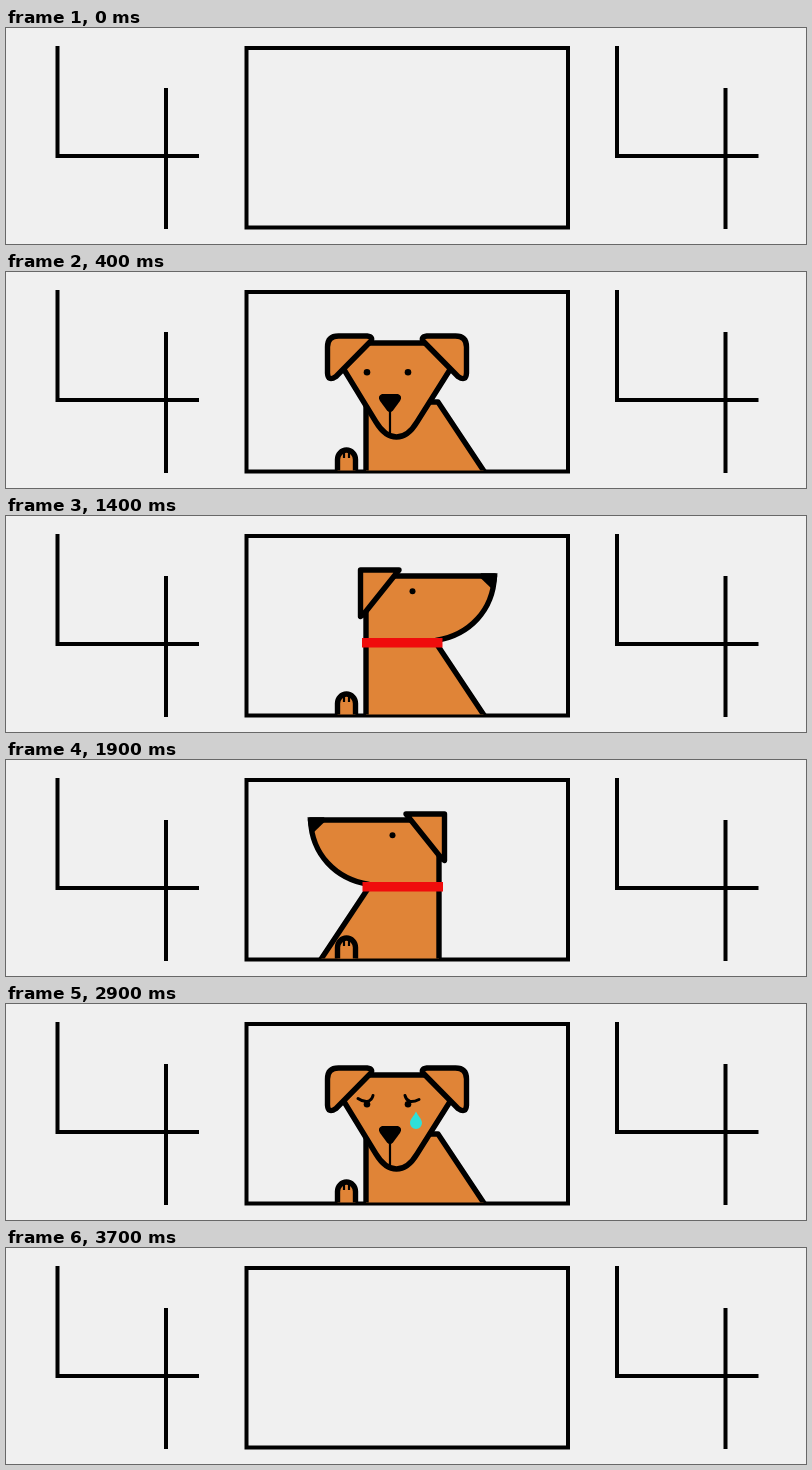
Write an HTML page that moves like this. It is 800x216 px and loops after 3.8 s.

```html
<!DOCTYPE html>
<html lang="en">
<head>
<meta charset="utf-8">
<title>404 dog</title>
<style>
html, body { margin: 0; height: 100%; overflow: hidden; background: #f0f0f0; }
svg { display: block; width: 800px; height: 216px; }
.line { fill: none; stroke: #000; stroke-width: 4; }
.fur { fill: #e08437; stroke: #000; stroke-width: 5.4; stroke-linejoin: round; }
.thin { fill: none; stroke: #000; stroke-width: 2.2; }
.lid { fill: none; stroke: #000; stroke-width: 3; stroke-linecap: round; }
</style>
</head>
<body>
<svg viewBox="0 0 800 216">
  <defs>
    <clipPath id="window"><path d="M238 18H564V198.5H238Z"/></clipPath>
    <path id="four" class="line" d="M51.5 18V128H193M160 60V201"/>
    <path id="ear" class="fur" d="M321.5 101V75Q321.5 64 332.5 64H361Q368 65 364.500 69.500L330 104.500Q322 110 321.500 101Z"/>
  </defs>
  <use href="#four"/>
  <use href="#four" x="559.500"/>
  <path class="line" d="M240.500 20H562V199.500H240.500Z"/>

  <g clip-path="url(#window)">
    <g id="front">
      <path class="fur" d="M360 215V130H432L488.500 215Z"/>
      <path class="fur" d="M362 71H420L445 96L411 150Q402 165 390.500 165Q379 165 370 150L337 96Z"/>
      <use href="#ear"/>
      <use href="#ear" transform="matrix(-1 0 0 1 782 0)"/>
      <circle cx="361" cy="100.300" r="3.300"/>
      <circle cx="402" cy="100.300" r="3.300"/>
      <path class="thin" d="M384 136V163"/>
      <path d="M376 122H392Q397 124 394 129L387 138.500Q384 142 381 138.500L374 129Q371 124 376 122Z"/>
      <g id="sad">
        <path class="lid" d="M352 94.500Q357 98 361.500 97.500Q366 96 367 91.500M399 91.500Q400 96 404 97.500Q408 98 413 95.500"/>
        <path fill="#2fe0d8" d="M410 107.500C412 112 416 115 416 119A6 6 0 0 1 404 119C404 115 408 112 410 107.500Z"/>
      </g>
    </g>
    <g id="side">
      <path class="fur" d="M360 215V60H488.500C487 94 464 119 430 124.500V127L488.500 215Z"/>
      <path class="fur" d="M354.500 54H393L357 99L354.500 100.500Z"/>
      <path d="M473 60.500L475 57.300H491.500Q491 67 487 74Z"/>
      <circle cx="406.500" cy="75.300" r="3"/>
      <path fill="#f00c0c" d="M356 122H436.500V131.500H356Z"/>
    </g>
    <g id="paw">
      <path class="fur" d="M331.500 203V187.500A9 9.500 0 0 1 349.500 187.500V203"/>
      <path class="thin" d="M338 180V186M343 180V186"/>
    </g>
  </g>
</svg>
<script>
const [front, side, sad, paw] = ["front", "side", "sad", "paw"].map(id => document.getElementById(id));
const show = (el, on) => el.setAttribute("display", on ? "inline" : "none");
const drops = [26, 80, 150];

function drop(t) {
  if (t < 400) return drops[3 - Math.floor(t / 100)];
  if (t >= 3400) return drops[Math.floor((t - 3400) / 100)];
  return 0;
}

function draw(now) {
  const t = now % 3800;
  const turn = Math.floor((t - 900) / 500);   // 0..3 while looking left and right
  const turned = turn >= 0 && turn < 4;
  const visible = t >= 100 && t < 3700;
  show(front, visible && !turned);
  show(side, turned);
  show(sad, t >= 2900);
  show(paw, visible);
  if (visible) front.setAttribute("transform", `translate(0 ${drop(t)})`);
  side.setAttribute("transform", turn % 2 ? "" : "matrix(-1 0 0 1 793 0)");
  requestAnimationFrame(start);
}

let origin;
function start(now) {
  origin ??= now;
  draw(now - origin);
}
requestAnimationFrame(start);
</script>
</body>
</html>
```
